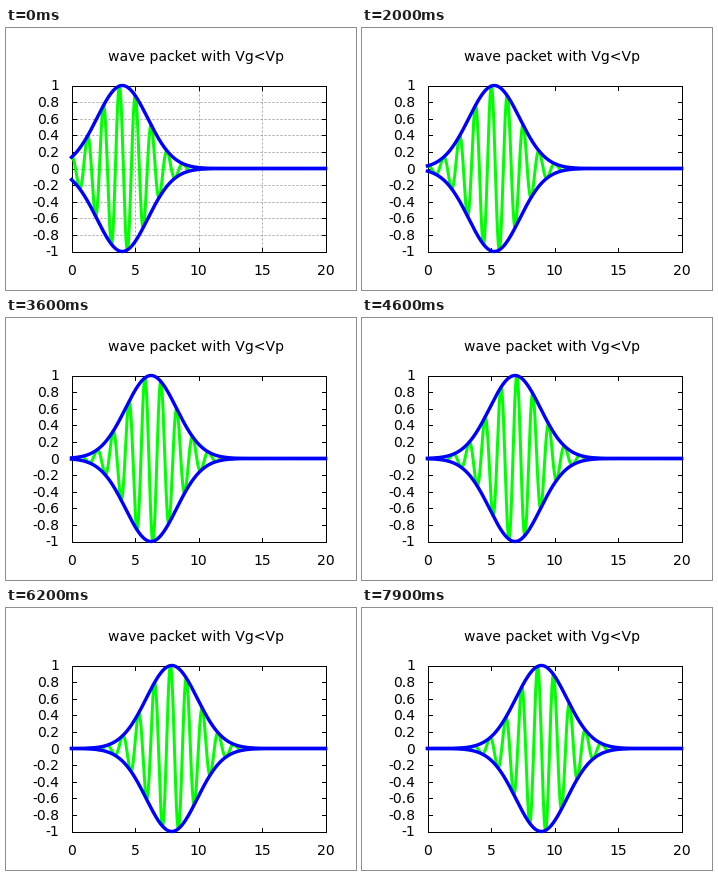
These frames come from a looping animation (350x262 px, 8 s). A matplotlib script:

```python
import numpy as np
import matplotlib.pyplot as plt
from matplotlib.animation import FuncAnimation

W, H, DPI = 350, 262, 100
PX = 72 / DPI                      # points per pixel
FRAMES, STEP_MS = 80, 100
LEFT, RIGHT, TOP, BOTTOM = 65.5, 319.5, 57.5, 223.5

K = 5                              # carrier wave number
VG = 2 * np.pi / 100               # group speed per step
VP = 2 * VG                        # phase speed per step

plt.rcParams["font.family"] = "DejaVu Sans"
fig = plt.figure(figsize=(W / DPI, H / DPI), dpi=DPI, facecolor="white")
ax = fig.add_axes([0, 0, 1, 1])
ax.set_xlim(0, W)
ax.set_ylim(H, 0)
ax.axis("off")


def sx(x):
    return LEFT + x * (RIGHT - LEFT) / 20


def sy(y):
    return (TOP + BOTTOM) / 2 - y * (BOTTOM - TOP) / 2


def line(xs, ys, color="black", width=1, **kw):
    return ax.plot(xs, ys, color=color, lw=width * PX, **kw)[0]


def label(x, y, text, size=14, **kw):
    ax.text(x, y, text, fontsize=size * PX, color="black", **kw)


grid = []


def grid_line(xs, ys):
    grid.append(line(xs, ys, "#a8a8a8", zorder=1, dashes=(2, 2)))


for v in range(-10, 11, 2):
    y = sy(v / 10)
    label(53, y + 5, f"{v / 10:g}", ha="right", va="baseline")
    line([LEFT, LEFT + 4], [y, y])
    line([RIGHT - 4, RIGHT], [y, y])
    grid_line([LEFT, RIGHT], [y, y])

for v in range(0, 21, 5):
    x = sx(v)
    label(x, 247, str(v), ha="center", va="baseline")
    line([x, x], [BOTTOM, BOTTOM - 4])
    line([x, x], [TOP, TOP + 4])
    grid_line([x, x], [TOP, BOTTOM])

line([LEFT, RIGHT, RIGHT, LEFT, LEFT], [TOP, TOP, BOTTOM, BOTTOM, TOP])
label(190.5, 33, "wave packet with Vg<Vp", ha="center", va="baseline")

x = np.linspace(0, 20, 600)
carrier = line(sx(x), sy(0 * x), "#00ff00", 3, zorder=3)
upper = line(sx(x), sy(0 * x), "#0000ff", 3.4, zorder=4)
lower = line(sx(x), sy(0 * x), "#0000ff", 3.4, zorder=4)


def draw(n):
    env = np.exp(-(x - 4 - VG * n) ** 2 / 8)
    carrier.set_ydata(sy(env * np.cos(K * (x - VP * n))))
    upper.set_ydata(sy(env))
    lower.set_ydata(sy(-env))
    for g in grid:
        g.set_visible(n == 0)
    return [carrier, upper, lower, *grid]


anim = FuncAnimation(fig, draw, frames=FRAMES, interval=STEP_MS,
                     repeat=True, repeat_delay=0, blit=False)
plt.show()
```
